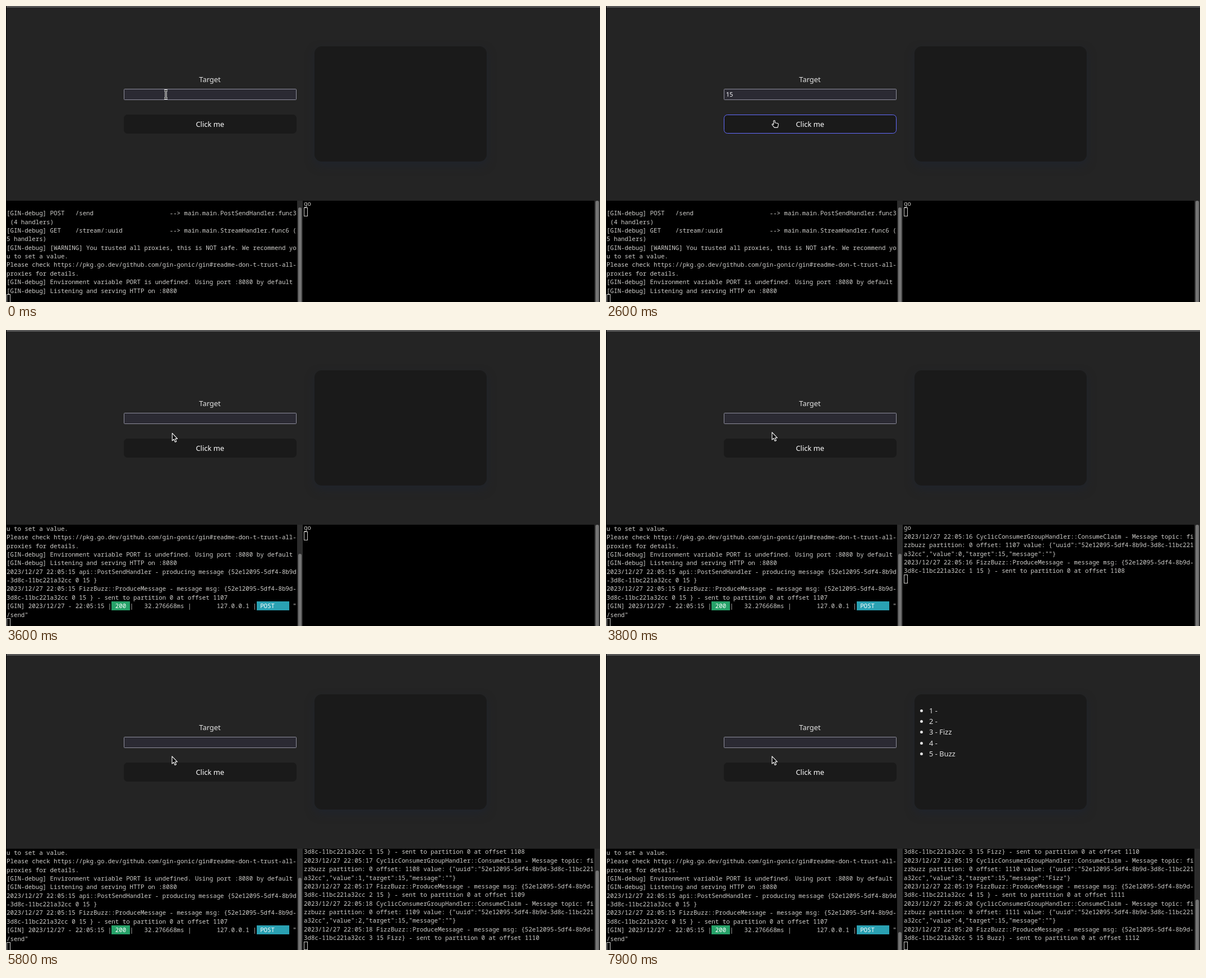
These frames come from a looping animation (1059x529 px, 8 s). An HTML page:

```html
<!DOCTYPE html>
<html lang="en">
<head>
<meta charset="utf-8">
<title>FizzBuzz stream</title>
<style>
  html, body { margin: 0; width: 100%; height: 100%; overflow: hidden; background: #000; }
  #stage { position: relative; width: 1059px; height: 529px; overflow: hidden; }
  #stage div, #stage svg, #stage ul { position: absolute; box-sizing: border-box; }
  .page { left: 1px; top: 0; width: 1058px; height: 347.5px; background: #242424; overflow: hidden;
    font: 12.94px/19.41px "Noto Sans", sans-serif; color: rgba(255,255,255,.87); }
  .bar { left: -1px; top: 0; width: 1059px; height: 2.5px; background: #555; overflow: hidden; }
  .bar span { position: absolute; left: 1px; top: -12.5px; white-space: pre; color: #aaa;
    font: 10.78px/15.37px "Noto Sans Mono", monospace; }
  .label { left: 209px; top: 122px; width: 307px; text-align: center; }
  #field { left: 209px; top: 148px; width: 308px; height: 19.5px; background: #2b2a33;
    border: 1px solid #8f8f9d; border-radius: 1.5px; }
  #field.focus { border: 1.7px solid #2a8fd4; box-shadow: 0 0 0 1px #24272a, 0 0 0 2.2px #23607f; border-radius: 2px; }
  #typed { left: 213px; top: 150px; height: 16px; line-height: 16px; font-size: 10.78px; color: #fbfbfe; }
  #caret { top: 151px; width: 1px; height: 14px; background: #fbfbfe; }
  #button { left: 209px; top: 193.5px; width: 307.5px; height: 34.5px; border-radius: 6.5px;
    background: #1a1a1a; border: 1px solid transparent; color: #fff; font-weight: 500;
    text-align: center; line-height: 33px; }
  #button.hover { border-color: #646cff; }
  .card { left: 549px; top: 72px; width: 307px; height: 206px; border-radius: 13px; background: #1a1a1a;
    box-shadow: 0 7px 16px rgba(28,36,52,.5); }
  #list { left: 549px; top: 91.5px; margin: 0; padding: 0 0 0 26px; }
  .term { top: 348px; height: 181px; background: #000; overflow: hidden; }
  .rows { white-space: pre; color: #d0cfcc; font: 10.78px/15.37px "Noto Sans Mono", monospace; }
  .rows b { display: inline-block; font-weight: 400; color: #fff; }
  .block { width: 7px; height: 15.4px; border: 1px solid #d0cfcc; }
  .track { width: 10px; top: 348px; height: 181px; background: #2c2c2c; }
  .thumb { left: 2px; width: 6px; bottom: 0; background: #747474; border-radius: 3px 3px 0 0; }
  .pointer { overflow: visible; left: 0; top: 0; width: 1px; height: 1px; }
</style>
</head>
<body>
<div id="stage">
  <div class="page">
    <div class="bar"><span>u to set a value.</span></div>
    <div class="label">Target</div>
    <div id="field"></div>
    <div id="typed"></div>
    <div id="caret"></div>
    <div id="button">Click me</div>
    <div class="card"></div>
    <ul id="list"></ul>
  </div>
  <div class="term" style="left:0;width:519px">
    <div class="rows" id="apiRows" style="left:1px;top:-1.2px"></div>
    <div class="block" style="left:1px;top:167px"></div>
  </div>
  <div class="track" style="left:519px"><div class="thumb" id="apiThumb"></div></div>
  <div class="term" style="left:529px;width:520px">
    <div class="rows" id="workRows" style="left:2px;top:-2.6px"></div>
    <div class="block" id="workBlock" style="left:2px"></div>
  </div>
  <div class="track" style="left:1049px"><div class="thumb" id="workThumb"></div></div>

  <svg class="pointer" id="ibeam">
    <path d="M-3 -7.3H-1L0 -6.5L1 -7.3H3M0 -6.5V6.5M-3 7.3H-1L0 6.5L1 7.3H3" fill="none" stroke="#fff" stroke-width="3.2"/>
    <path d="M-3 -7.3H-1L0 -6.5L1 -7.3H3M0 -6.5V6.5M-3 7.3H-1L0 6.5L1 7.3H3" fill="none" stroke="#111" stroke-width="1.2"/>
  </svg>
  <svg class="pointer" id="arrow">
    <path d="M.5 .8V14.2L3.5 11.5L5.7 16.5L8 15.5L5.8 10.7H9.8Z" fill="#0a0a0a" stroke="#fff" stroke-width="1.1" stroke-linejoin="round"/>
  </svg>
  <svg class="pointer" id="hand">
    <path d="M-1.2 7V1.2Q-1.2 0 0 0Q1.2 0 1.2 1.2V4.2L6.3 5.2Q7.4 5.6 7.3 7L6.7 10.3L6 12.6H.2L-3.7 8Q-4.2 6.6 -3 6.4Q-2 6.3 -1.2 7.4Z" fill="#0a0a0a" stroke="#fff" stroke-width="1.1" stroke-linejoin="round"/>
  </svg>
</div>
<script>
const LOOP = 8000, COLS = 80, ROW = 15.37;
const UUID = "52e12095-5df4-8b9d-3d8c-11bc221a32cc";
const $ = id => document.getElementById(id);

const wrap = lines => lines.flatMap(s => s.match(new RegExp(`.{1,${COLS}}`, "g")) || [""]);
const word = n => (n % 3 ? "" : "Fizz") + (n % 5 ? "" : "Buzz");
const route = (verb, path, handler, n) =>
  `[GIN-debug] ${verb.padEnd(6)} ${path.padEnd(25)} --> main.main.${handler} (${n} handlers)`;

const boot = wrap(["",
  route("POST", "/send", "PostSendHandler.func3", 4),
  route("GET", "/stream/:uuid", "StreamHandler.func6", 5),
  "[GIN-debug] [WARNING] You trusted all proxies, this is NOT safe. We recommend you to set a value.",
  "Please check https://pkg.go.dev/github.com/gin-gonic/gin#readme-don-t-trust-all-proxies for details.",
  "[GIN-debug] Environment variable PORT is undefined. Using port :8080 by default",
  "[GIN-debug] Listening and serving HTTP on :8080"]);
const sent = wrap([
  `2023/12/27 22:05:15 api::PostSendHandler - producing message {${UUID} 0 15 }`,
  `2023/12/27 22:05:15 FizzBuzz::ProduceMessage - message msg: {${UUID} 0 15 } - sent to partition 0 at offset 1107`,
  `[GIN] 2023/12/27 - 22:05:15 | 200 |   32.276668ms |       127.0.0.1 | POST     "/send"`]);

function consumed(k) {
  const stamp = `2023/12/27 22:05:${16 + k}`, msg = k ? word(k) : "";
  return wrap([
    `${stamp} CyclicConsumerGroupHandler::ConsumeClaim - Message topic: fizzbuzz partition: 0 offset: ${1107 + k} value: {"uuid":"${UUID}","value":${k},"target":15,"message":"${msg}"}`,
    `${stamp} FizzBuzz::ProduceMessage - message msg: {${UUID} ${k + 1} 15 ${word(k + 1)}} - sent to partition 0 at offset ${1108 + k}`]);
}

const paint = lines => lines.slice(-11).join("\n")
  .replace("| 200 |", '|<b style="background:#26a269"> 200 </b>|')
  .replace("| POST    ", '|<b style="background:#2aa1b3"> POST    </b>');

function put(id, html) {
  const el = $(id);
  if (el.shown !== html) el.innerHTML = el.shown = html;
}

// Pointer legs: start, end, from, to; stepped every 100 ms
const legs = [
  [0, 1300, [285, 158], [285, 158]],
  [1900, 2400, [286, 165], [300, 204.5]],
  [3200, 3700, [300, 204.5], [295.5, 182]]];

function pointerAt(t) {
  if (t >= 1300 && t < 1900) return null;
  const [a, b, p, q] = legs.filter(l => l[0] <= t).pop();
  const step = Math.floor((t - a) / 100) + (a === 3200 ? 1 : 0);
  const u = Math.min(1, step / ((b - a) / 100 + (a === 3200 ? 1 : 0)));
  const e = u * u * (3 - 2 * u);
  return p.map((v, i) => v + (q[i] - v) * e);
}

function render(t) {
  const pos = pointerAt(t);
  const kind = !pos ? "" : pos[1] < 168 ? "ibeam" : pos[1] < 193.5 ? "arrow" : "hand";
  for (const id of ["ibeam", "arrow", "hand"]) {
    $(id).style.display = id === kind ? "block" : "none";
    if (id === kind) $(id).style.transform = `translate(${pos[0]}px,${pos[1]}px)`;
  }
  $("button").className = kind === "hand" ? "hover" : "";

  const focus = t >= 900 && t < 2600;
  const typed = t < 1300 || t >= 2700 ? "" : t < 1600 ? "1" : "15";
  $("field").className = focus ? "focus" : "";
  put("typed", typed);
  $("caret").style.display = focus && t < 2100 ? "block" : "none";
  $("caret").style.left = 213 + typed.length * 6.17 + "px";

  const posted = t >= 2700, listed = t >= 7900;
  put("apiRows", paint(posted ? boot.concat(sent) : boot));
  $("apiThumb").style.height = (listed ? 32 : posted ? 129 : 169) + "px";

  const count = Math.max(0, Math.floor((t - 2800) / 1000));
  let log = ["go"];
  for (let k = 0; k < count; k++) log = log.concat(consumed(k));
  put("workRows", paint(log));
  $("workBlock").style.top = Math.min(log.length, 11) * ROW - 3 + "px";
  $("workThumb").style.height = Math.min(181, 2420 / (log.length + 1)) + "px";

  put("list", listed ? [1, 2, 3, 4, 5].map(n => `<li>${n} - ${word(n)}</li>`).join("") : "");
}

function tick() {
  render(performance.now() % LOOP);
  requestAnimationFrame(tick);
}
tick();
</script>
</body>
</html>
```
